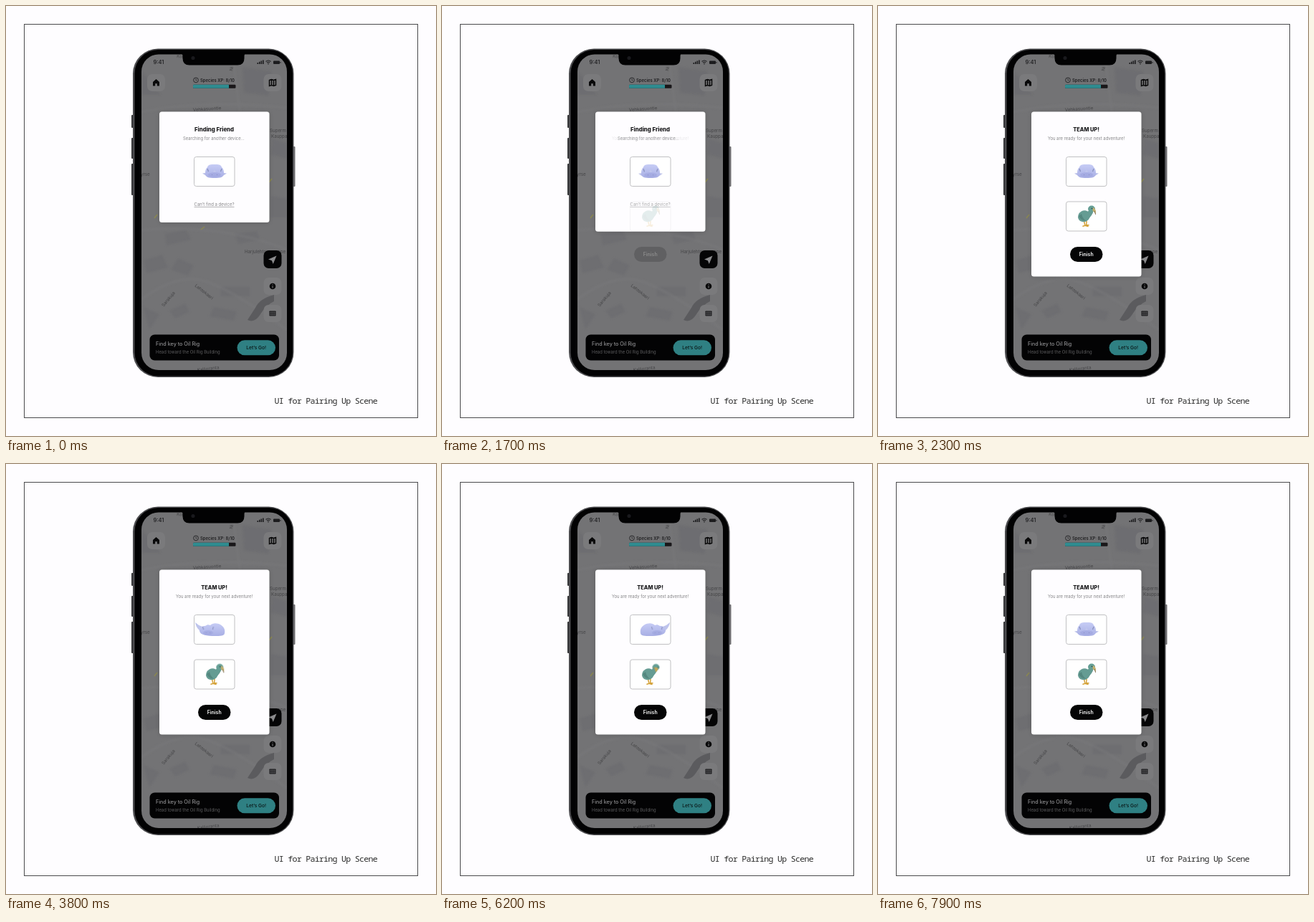
Recreate the animation shown at these times as an HTML page. Size 600 by 600 pixels, loop 8 s.

```html
<!DOCTYPE html>
<html lang="en">
<head>
<meta charset="utf-8">
<title>Pairing screen</title>
<style>
html, body { margin: 0; width: 100%; height: 100%; overflow: hidden; background: #fefdff; }
svg { display: block; width: 600px; height: 600px; }
text { font-family: Inter, sans-serif; }
.mid { text-anchor: middle; }
.map text { font-size: 6.2px; fill: #454547; }
.caption { font: 11.6px "Noto Sans Mono", monospace; letter-spacing: -.72px; fill: #2a2a2a; }
.title { font-size: 7.8px; font-weight: 800; fill: #1b1b1d; }
.sub { font-size: 5.9px; fill: #858587; }
.link { font-size: 6px; fill: #858587; text-decoration: underline; }
.card { fill: #fff; stroke: #b9b9bb; stroke-width: .9; }

.panel, .out, .in, .slide, .title, .body, .horn, .face, .feet, .side, .turned, .head {
  animation: 8s infinite cubic-bezier(.42, 0, .58, 1);
}
.panel { animation-name: grow; }
.out { animation-name: fadeOut; }
.in { animation-name: fadeIn; }
.slide { animation-name: slide; }
.title.old { animation-name: oldTitle; }
.title.new { animation-name: newTitle; }
@keyframes grow { 0%, 19.5% { height: 154.5px } 25.7%, 100% { height: 230px } }
@keyframes fadeOut { 0%, 19.5% { opacity: 1 } 25.7%, 100% { opacity: 0 } }
@keyframes fadeIn { 0%, 19.5% { opacity: 0 } 25.7%, 100% { opacity: 1 } }
@keyframes slide { 0%, 19.5% { transform: none } 25.7%, 100% { transform: translateX(-12px) } }
@keyframes oldTitle { 0%, 21.3% { opacity: 1 } 25.7%, 100% { opacity: 0 } }
@keyframes newTitle { 0%, 21.3% { opacity: 0 } 25.7%, 100% { opacity: 1 } }

/* The rhino looks left, then right */
.body { animation-name: body; }
.horn { animation-name: horn; }
.face { animation-name: face; }
.feet { animation-name: feet; }
@keyframes body {
  0%, 34%, 58.5%, 68.5%, 87%, 100% { d: path("M-13 3C-13 -2 -12 -4 -10 -6C-9 -10 -5 -10 0 -10C5 -10 9 -10 10 -6C12 -4 13 -2 13 3C13 8 8 9 0 9C-8 9 -13 8 -13 3Z") }
  43.5%, 50.5% { d: path("M-21 2C-22 -3 -18 -5 -13 -5C-10 -7 -9 -7 -6 -6C-2 -10 4 -9 8 -7C13 -4 15 0 14 5C14 9 8 9 0 9C-10 9 -20 8 -21 2Z") }
  75.5%, 79.5% { d: path("M-14 5C-15 0 -13 -4 -8 -7C-4 -9 2 -10 6 -6C9 -7 10 -7 13 -5C18 -5 22 -3 21 2C20 8 10 9 0 9C-8 9 -14 9 -14 5Z") }
}
@keyframes horn {
  0%, 34%, 58.5%, 68.5%, 87%, 100% { d: path("M-2 1Q-1 -2 0 -3Q1 -2 2 1Z") }
  43.5%, 50.5% { d: path("M-21 1Q-26 -3 -27 -10Q-23 -6 -17 -4Z") }
  75.5%, 79.5% { d: path("M17 -4Q23 -6 27 -10Q26 -3 21 1Z") }
}
@keyframes face {
  0%, 34%, 58.5%, 68.5%, 87%, 100% { transform: none }
  10% { transform: translateY(.5px) }
  43.5%, 50.5% { transform: translateX(-9px) scaleX(.75) }
  75.5%, 79.5% { transform: translateX(9px) scaleX(.75) }
}
@keyframes feet {
  0%, 34%, 58.5%, 68.5%, 87%, 100% { opacity: 1; transform: none }
  5%, 15% { transform: translateY(.5px) }
  10% { transform: translateY(-.4px) }
  38%, 54%, 72%, 83% { opacity: 0 }
}

/* The bird turns its head to the viewer and back */
.side { animation-name: side; }
.turned { animation-name: turned; }
.head { animation-name: nod; }
@keyframes side { 0%, 52.5%, 97%, 100% { opacity: 1 } 58%, 91% { opacity: 0 } }
@keyframes turned { 0%, 52.5%, 97%, 100% { opacity: 0 } 58%, 91% { opacity: 1 } }
@keyframes nod {
  0%, 30%, 52.5%, 97%, 100% { transform: none }
  46% { transform: translate(.3px, .4px) }
  58%, 91% { transform: translate(.5px, .5px) }
}
</style>
</head>
<body>
<svg viewBox="0 0 600 600">
  <defs>
    <clipPath id="screen"><rect x="189" y="67.500" width="203" height="440.500" rx="24"/></clipPath>
    <filter id="soft"><feGaussianBlur stdDeviation="1.4"/></filter>
    <filter id="shade" x="-20%" y="-20%" width="140%" height="140%"><feGaussianBlur stdDeviation="3"/></filter>
    <linearGradient id="skin" x1="0" y1="0" x2="0" y2="1">
      <stop offset="0" stop-color="#c6ccf5"/><stop offset="1" stop-color="#a8afe4"/>
    </linearGradient>
  </defs>
  <rect width="600" height="600" fill="#fefdff"/>
  <rect x="25.5" y="25.5" width="549" height="549" fill="none" stroke="#4a4a4c"/>
  <text class="caption" x="374.5" y="555">UI for Pairing Up Scene</text>

  <!-- Phone -->
  <g fill="#38383a">
    <rect x="175" y="152" width="4" height="18" rx="1"/>
    <rect x="175" y="184" width="4" height="29" rx="1"/>
    <rect x="175" y="220" width="4" height="44" rx="1"/>
    <rect x="399" y="196" width="4.5" height="56" rx="1" fill="#737375"/>
  </g>
  <rect x="177" y="59.5" width="224.5" height="458.5" rx="35" fill="#4b4b4e"/>
  <rect x="179.5" y="61" width="220.5" height="455.5" rx="33" fill="#020203"/>

  <g clip-path="url(#screen)">
    <rect x="188" y="67" width="205" height="442" fill="#737375"/>
    <g class="map">
      <g filter="url(#soft)" fill="#6c6c6f" opacity=".7">
        <path d="M222 318l30-6 6 14-34 8zM192 355l26-8 8 18-30 8zM240 352l22 10-8 14-24-8zM300 392h40v13h-40zM320 318l30-4 4 12-30 6zM228 425l22-10 6 12-20 9z"/>
        <path d="M190 92l26 32h-26zM330 85l40 6-4 34-34-4zM290 420l32 6-4 13-34-6zM192 420l22 10-14 22z"/>
        <path d="M372 185l20 6v22l-22-6zM370 265l22 4v26h-22z"/>
      </g>
      <g fill="none" stroke="#79797b" stroke-width="3" filter="url(#soft)" opacity=".6">
        <path d="M188 148Q280 130 392 142M188 410Q240 372 278 384T392 452M188 313Q300 303 392 340M316 67l10 80"/>
      </g>
      <path d="M374 403Q354 408 348 421L337 438Q347 443 355 430Q362 418 374 412Z" fill="#5b5b5e"/>
      <path d="M207 296l4-5M272 312l5-4M367 246l4-5" stroke="#8b8850" stroke-width="1.5"/>
      <text x="238" y="72" transform="rotate(5 238 72)">Kor</text>
      <text transform="translate(316 91) rotate(-78)">Ni</text>
      <text transform="translate(261 147) rotate(-4)">Vehkasuontie</text>
      <text x="368" y="176">Superm</text>
      <text x="370" y="184">Kauppa</text>
      <text x="188" y="237">yrse</text>
      <text x="333" y="345">Harjulehto</text>
      <text x="379" y="345">ope</text>
      <text transform="translate(220 420) rotate(-50)">Sarakuja</text>
      <text transform="translate(263 391) rotate(38)">Lehtokaari</text>
      <text transform="translate(267 510) rotate(-7)">Kallioranta</text>
    </g>

    <!-- Status bar -->
    <text x="205.5" y="81" font-size="7.6" font-weight="500" fill="#1c1c1e">9:41</text>
    <g fill="#1c1c1e">
      <path d="M350.5 79h1.6v2h-1.6zM353 77.8h1.6V81H353zM355.5 76.6h1.6V81h-1.6zM358 75.5h1.6V81H358z"/>
      <rect x="373" y="76.5" width="9" height="4.5" rx="1"/><path d="M382.5 78h1v1.8h-1z"/>
    </g>
    <g fill="none" stroke="#1c1c1e" stroke-width="1.1">
      <path d="M362.6 77.5q3.4-3 6.8 0M364 79.2q2-1.8 4 0"/><circle cx="366" cy="80.6" r=".3"/>
    </g>

    <!-- Controls -->
    <g fill="#7a7a7c">
      <rect x="197" y="95" width="25" height="24" rx="7"/>
      <rect x="359.5" y="95" width="25" height="24" rx="7"/>
      <rect x="359.5" y="379" width="25" height="24" rx="7"/>
      <rect x="359.5" y="417" width="25" height="24" rx="7"/>
    </g>
    <path d="M205 106l4.5-4 4.5 4v5.5h-3.2v-3.3h-2.6v3.3H205z" fill="#09090a"/>
    <path d="M367.5 103.5l3-1 3 1 3-1v8l-3 1-3-1-3 1zM370.5 102.5v8M373.5 103.5v8" fill="none" stroke="#09090a" stroke-width="1.5"/>
    <circle cx="265" cy="103.4" r="3.4" fill="none" stroke="#222224" stroke-width=".9"/>
    <path d="M265 101.5v2.2h1.3" fill="none" stroke="#222224" stroke-width=".8"/>
    <text x="271" y="105.7" font-size="5.9" font-weight="600" fill="#202022">Species XP: 8/10</text>
    <rect x="261" y="109.8" width="59.5" height="5" rx="1.2" fill="#191719"/>
    <path d="M262.2 109.8H311v5h-48.8a1.2 1.2 0 0 1-1.2-1.2v-2.6a1.2 1.2 0 0 1 1.2-1.2z" fill="#2f8c90"/>
    <rect x="359.5" y="341" width="25" height="25" rx="7" fill="#050506"/>
    <path d="M366 353.5l11.5-5-4.8 11.6-1.8-4.8z" fill="#8b8b8d"/>
    <circle cx="372" cy="391" r="4.3" fill="#09090a"/>
    <path d="M372 390.4v3M372 388.3v1" stroke="#7a7a7c" stroke-width="1.1"/>
    <rect x="367.5" y="425.5" width="9" height="7" rx=".8" fill="#161618"/>
    <path d="M367.5 427.8h9M367.5 430.2h9M369.8 425.5v7M372.1 425.5v7M374.3 425.5v7" stroke="#7a7a7c" stroke-width=".45"/>

    <rect x="200.5" y="458.5" width="180.5" height="36" rx="7" fill="#030304"/>
    <text x="209" y="473.5" font-size="7.2" font-weight="500" fill="#8e8e90">Find key to Oil Rig</text>
    <text x="209" y="485" font-size="5.9" fill="#5c5c5e">Head toward the Oil Rig Building</text>
    <rect x="322.5" y="466.3" width="53.5" height="21" rx="10.5" fill="#2f8083"/>
    <text class="mid" x="349.2" y="479.3" font-size="6.7" font-weight="500" fill="#0a1516">Let’s Go!</text>
  </g>
  <path d="M243 66q3.5 0 3.5 4v3q0 9.5 9.5 9.500h67q9.5 0 9.5-9.500v-3q0-4 3.500-4z" fill="#020203"/>
  <circle cx="261" cy="72.5" r="2.6" fill="#19191d"/>

  <!-- Dialog -->
  <rect class="panel" x="214" y="148" width="153.5" height="154.5" rx="4" opacity=".16" filter="url(#shade)"/>
  <rect class="panel" x="214" y="147.5" width="153.5" height="154.5" rx="3.5" fill="#fefdff"/>
  <text class="title old mid" x="290.5" y="175">Finding Friend</text>
  <g class="out">
    <text class="sub slide" x="247" y="187">Searching for another device...</text>
    <text class="link mid" x="290.5" y="279.3">Can’t find a device?</text>
  </g>
  <rect class="card" x="262.5" y="210.5" width="56.5" height="41" rx="3"/>

  <g transform="translate(291 231)">
    <path class="feet" d="M-12 2L-17 2.500L-12 5.500ZM12 2L17 2.500L12 5.500Z" fill="#b3b9e6"/>
    <path class="body" d="M-13 3C-13 -2 -12 -4 -10 -6C-9 -10 -5 -10 0 -10C5 -10 9 -10 10 -6C12 -4 13 -2 13 3C13 8 8 9 0 9C-8 9 -13 8 -13 3Z" fill="url(#skin)"/>
    <path class="horn" d="M-2 1Q-1 -2 0 -3Q1 -2 2 1Z" fill="#bec4ec"/>
    <g class="face">
      <ellipse cy="4.5" rx="9" ry="3.3" fill="#9ca4dd" opacity=".6"/>
      <path d="M-10 -4l1.500 4M10 -4l-1.500 4" stroke="#858eba" stroke-width="1.2"/>
      <path d="M-4 4.500h1M3 4.500h1" stroke="#858dc1" stroke-width=".9"/>
    </g>
  </g>

  <text class="title new mid" x="290.5" y="175" style="font-size: 7.4px">TEAM UP!</text>
  <g class="in">
    <text class="sub mid" x="290.5" y="187">You are ready for your next adventure!</text>
    <rect class="card" x="262.5" y="273" width="56.5" height="41" rx="3"/>
    <g transform="translate(288 293)">
      <path d="M-.5 7L1 13.500M3 7L2.800 12.500M-2 14.200L1 13.300L5 14.500M2.500 12.500L6 12.800" fill="none" stroke="#d4a136" stroke-width="1.5" stroke-linecap="round"/>
      <ellipse rx="8.8" ry="7.7" cx="-.5" transform="rotate(-30)" fill="#659c93"/>
      <path d="M-8 0Q-5 7 2 6.500Q-3 3 -4 -3Z" fill="#54877f"/>
      <path d="M1 -4Q6 -5 7 -11L13 -8Q11 0 5 4Z" fill="#659c93"/>
      <g class="head">
        <ellipse cx="10" cy="-10" rx="5" ry="4.4" fill="#659f95"/>
        <g class="side">
          <path d="M12 -12Q17 -10 15.700 -2Q14.500 -6 11.500 -7Z" fill="#c5b06e"/>
          <path d="M14 -7l1.700 5" stroke="#594a37" stroke-width=".7"/>
          <circle cx="10.5" cy="-10.5" r=".8" fill="#283e3a"/>
        </g>
        <g class="turned">
          <path d="M8 -9Q11 -11 13 -8Q12 -4 9.500 -3Z" fill="#c5a554"/>
          <circle cx="7.5" cy="-9" r="1.1" fill="#d0b970"/>
          <circle cx="7.5" cy="-9" r=".5" fill="#263633"/>
          <circle cx="13" cy="-10" r=".6" fill="#263633"/>
        </g>
      </g>
    </g>
    <rect x="268" y="336" width="45.5" height="21" rx="10.5" fill="#050506"/>
    <text class="mid" x="290.7" y="349" font-size="6.9" font-weight="600" fill="#fff">Finish</text>
  </g>
</svg>
</body>
</html>
```
